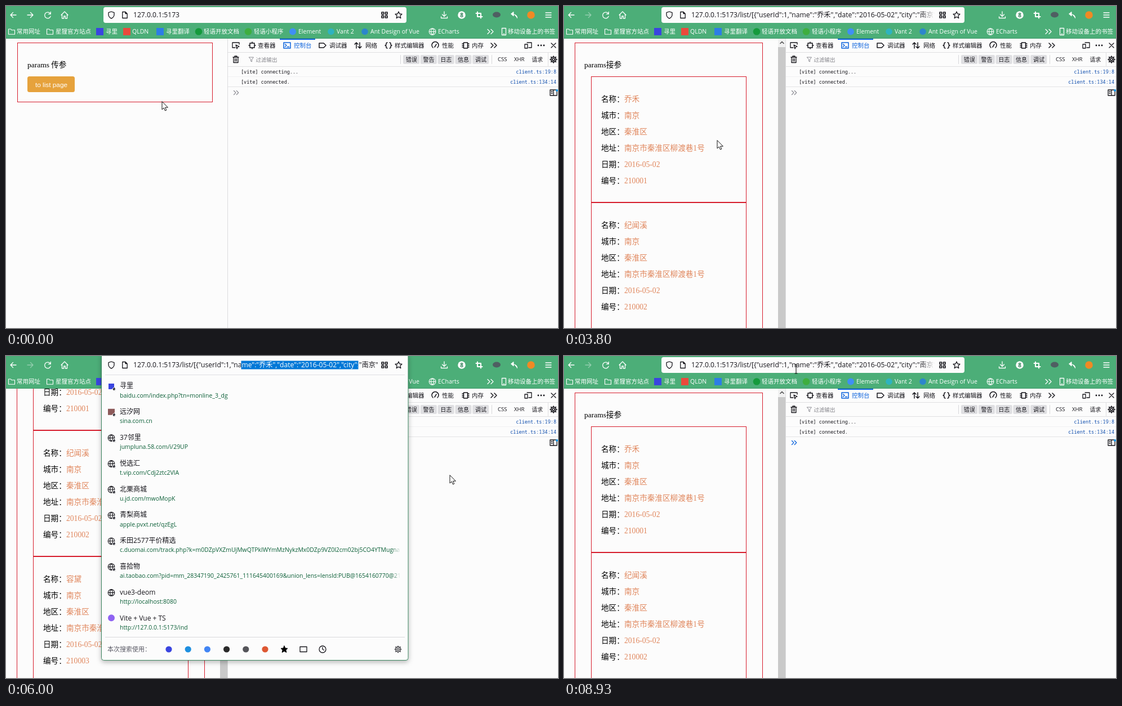
An HTML page that plays this animation: 980 px wide and 572 px high, repeating every 8990 ms.

```html
<!DOCTYPE html>
<html lang="zh-CN">
<head>
<meta charset="utf-8">
<title>params</title>
<style>
html, body { margin: 0; width: 100%; height: 100%; overflow: hidden; background: #fcfcfc; }
svg { display: block; width: 980px; height: 572px; }
text { white-space: pre; }
.ui { font-family: "Open Sans", "Noto Sans CJK SC", "Noto Sans CJK", sans-serif; }
.serif { font-family: "Liberation Serif", "Noto Sans CJK SC", "Noto Sans CJK", serif; }
.arial { font-family: "Liberation Sans", sans-serif; }
.mono { font-family: "Noto Sans Mono", "DejaVu Sans Mono", monospace; }
</style>
</head>
<body>
<svg id="stage" viewBox="0 0 980 572" xmlns="http://www.w3.org/2000/svg"></svg>
<script>
const LOOP = 8990, STEP = 200 / 3;
const GREEN = '#4cae78', INK = '#15141a', PAPER = '#fcfcfc', RED = '#d61c2c', BLUE = '#0a62dc';

const esc = s => s.replace(/&/g, '&amp;').replace(/</g, '&lt;');
const text = (x, y, s, size, fill = INK, cls = 'ui', extra = '') =>
  `<text x="${x}" y="${y}" font-size="${size}" fill="${fill}" class="${cls}" ${extra}>${esc(s)}</text>`;
const rect = (x, y, w, h, fill, extra = '') =>
  `<rect x="${x}" y="${y}" width="${w}" height="${h}" fill="${fill}" ${extra}/>`;
const frame = (x, y, w, h) => rect(x, y, w, h, 'none', `stroke="${RED}"`);
const dot = (x, y, r, fill) => `<circle cx="${x}" cy="${y}" r="${r}" fill="${fill}"/>`;
const icon = (x, y, d, color = INK, w = 1.3, fill = 'none', extra = '') =>
  `<path transform="translate(${x} ${y})" d="${d}" stroke="${color}" stroke-width="${w}" fill="${fill}" stroke-linecap="round" stroke-linejoin="round" ${extra}/>`;
const line = (x1, y1, x2, y2, color = '#e0e0e2') =>
  `<path d="M${x1} ${y1}L${x2} ${y2}" stroke="${color}"/>`;
const group = (id, body) => `<g id="${id}">${body}</g>`;

const ICON = {
  back: 'M5 0H-5M-.5-4.5-5 0-.5 4.5',
  forward: 'M-5 0H5M.5-4.5 5 0 .5 4.5',
  reload: 'M4.8-2.6A5.4 5.4 0 1 0 5.2 1.6M5.2-6v3.8H1.4',
  close: 'M-4-4 4 4M4-4-4 4',
  home: 'M-6 0 0-6 6 0M-4.5-1.5V6h3.2V2h2.6v4h3.2V-1.5',
  shield: 'M0-6 5-4.3V0Q4.5 4 0 6.2-4.5 4-5 0V-4.3Z',
  file: 'M-4.2-5.5H1L4.2-2.3V5.5H-4.2ZM1-5.5v3.2h3.2',
  grid: 'M-5-5h3.6v3.6H-5ZM1.4-5H5v3.6H1.4ZM-5 1.4h3.6V5H-5ZM1.4 1.4H5V5H1.4Z',
  star: 'M0-6 1.8-2 6-1.6 2.9 1.3 3.8 5.6 0 3.3-3.8 5.6-2.9 1.3-6-1.6-1.8-2Z',
  download: 'M0-6V2.5M-3.5-1 0 2.5 3.5-1M-5.5 3v2.5h11V3',
  crop: 'M-3-5.5V3H5.5M-5.5-3H3V5.5',
  undo: 'M5.5 5Q5.5-1.5-1-1.5V1.5L-5.5-2.5-1-6v3',
  menu: 'M-5-4H5M-5 0H5M-5 4H5',
  folder: 'M-5.5-4.5h4l1.5 1.8h5.5V4.7h-11Z',
  globe: 'M-5.8 0a5.8 5.8 0 1 0 11.6 0a5.8 5.8 0 1 0-11.6 0H5.8M0-5.8Q-5.4 0 0 5.8Q5.4 0 0-5.8',
  more: 'M-5-4-1 0-5 4M1-4 5 0 1 4',
  prompt: 'M-4-3.5-.5 0-4 3.5M.8-3.5 4.3 0 .8 3.5',
  phone: 'M-3.5-6h7V6h-7ZM-.5 4h1',
  picker: 'M-1 4h-5v-9H6v3M0-1 6 2 3.2 3 2 6Z',
  inspect: 'M-4-4H4V4H-4ZM0-6v2M0 6V4M-6 0h2M6 0H4',
  terminal: 'M-6-5H6V5H-6ZM-3.5-2.2-1 0-3.5 2.2M.5 2.5h3',
  tag: 'M-6-4H2L6 0 2 4H-6Z',
  arrows: 'M-3 5V-5M-6-2-3-5 0-2M3-5V5M0 2 3 5 6 2',
  braces: 'M-2-5Q-4-5-4-3-4 0-6 0-4 0-4 3-4 5-2 5M2-5Q4-5 4-3 4 0 6 0 4 0 4 3 4 5 2 5',
  gauge: 'M-4 4A6 6 0 1 1 4 4M-1 3 2-2',
  chip: 'M-3.5-5h7V5h-7ZM-6-3h2.5M-6 0h2.5M-6 3h2.5M6-3H3.5M6 0H3.5M6 3H3.5',
  devices: 'M-2-5H6V4H1M-6-2h5V5h-5Z',
  trash: 'M-5-4H5M-2-4v-2h4v2M-4-4V5.5H4V-4M-1.3-1.5v4.5M1.3-1.5v4.5',
  funnel: 'M-4-4H4L1 0V4L-1 3V0Z',
  split: 'M-6-5H6V5H-6ZM0-5V5M-4-2h2M-4 1h2',
  box: 'M-6-4.5H6V4.5H-6Z',
  clock: 'M-6 0a6 6 0 1 0 12 0a6 6 0 1 0-12 0M0-3.5V0L2.5 1.5',
  pin: 'M-3-1 1-4 3 1 1 1 4 4 0 2-1 3Z',
  gear: 'M-2 0a2 2 0 1 0 4 0a2 2 0 1 0-4 0M-4.4 0a4.4 4.4 0 1 0 8.8 0a4.4 4.4 0 1 0-8.8 0'
    + 'M0-5V-6M0 5V6M-5 0H-6M5 0H6M-3.5-3.5l-.8-.8M3.5-3.5l.8-.8M-3.5 3.5l-.8.8M3.5 3.5l.8.8'
};

const URL_HEAD = '127.0.0.1:5173';
const URL_FULL = URL_HEAD + '/list/[{"userId":1,"name":"乔禾","date":"2016-05-02","city":"南京"';

function homePage() {
  return frame(20.5, 65.5, 346, 105)
    + text(38, 109, 'params 传参', 13.5, '#000', 'serif')
    + rect(38, 125, 84, 28, '#e6a23c', 'rx="3.5" id="button"')
    + text(52, 144, 'to list page', 11.8, '#fff', 'arial');
}

function listPage() {
  const people = ['乔禾', '纪闻溪', '容黛'];
  const card = (name, i) => {
    const top = 125.5 + i * 224;
    const rows = [['名称', name], ['城市', '南京'], ['地区', '秦淮区'], ['地址', '南京市秦淮区柳渡巷1号'],
      ['日期', '2016-05-02'], ['编号', String(210001 + i)]];
    return frame(48.5, top, 275, 223) + rows.map(([key, value], j) => {
      const y = top + 44.5 + j * 29;
      return text(66, y, key + '：', 13.6, '#000', 'serif') + text(107, y, value, 13.6, '#e0865c', 'serif');
    }).join('');
  };
  return group('scroll', frame(19.5, 65.5, 333, 800)
      + text(36, 109, 'params接参', 13.5, '#000', 'serif') + people.map(card).join(''))
    + rect(380, 58, 13, 15, '#f1f1f1') + rect(380, 73, 13, 499, '#c9c9c9')
    + icon(387, 65, 'M-3 1.5 0-1.5 3 1.5', '#505050', 1.6);
}

function devtools() {
  const tabs = [[437, 447, 'inspect', '查看器'], [499, 511, 'terminal', '控制台'], [562, 574, 'tag', '调试器'],
    [625, 638, 'arrows', '网络'], [679, 690, 'braces', '样式编辑器'], [762, 774, 'gauge', '性能'], [816, 827, 'chip', '内存']];
  const filters = ['错误', '警告', '日志', '信息', '调试'];
  return rect(393, 58, 587, 514, PAPER) + line(393.5, 58, 393.5, 572, '#dcdcde')
    + line(394, 82.5, 980, 82.5) + line(394, 107.5, 980, 107.5) + line(394, 125.5, 980, 125.5, '#f1f1f2')
    + line(394, 143.5, 980, 143.5, '#e4e4e6')
    + rect(486, 58, 63, 2, BLUE)
    + icon(408, 70, ICON.picker)
    + tabs.map(([ix, tx, name, label], i) => {
      const color = i === 1 ? BLUE : INK;
      return icon(ix, 70, ICON[name], color, 1.5) + text(tx, 74, label, 10.5, color);
    }).join('')
    + icon(866, 70, ICON.more, INK, 1.5) + icon(927, 70, ICON.devices)
    + [945, 950, 955].map(x => dot(x, 70, 1.4, INK)).join('') + icon(972, 70, ICON.close)
    + icon(408, 95, ICON.trash) + icon(435.5, 95, ICON.funnel, '#909096', 1)
    + text(443.5, 98.5, '过滤输出', 9.5, '#85858b')
    + line(700.5, 87, 700.5, 103, '#d7d7db') + line(862.5, 87, 862.5, 103, '#d7d7db') + line(962.5, 83, 962.5, 107)
    + filters.map((s, i) => rect(705 + i * 30.8, 87, 29, 16, '#dfdfe2', 'rx="2"') + text(709.7 + i * 30.8, 98.7, s, 10)).join('')
    + text(873, 98.3, 'CSS', 9.6) + text(902, 98.3, 'XHR', 9.6) + text(933.5, 98.6, '请求', 9.8)
    + icon(972, 95, ICON.gear, INK, 1.7)
    + text(417, 119.5, '[vite] connecting...', 8.52, INK, 'mono') + text(417, 137.5, '[vite] connected.', 8.52, INK, 'mono')
    + text(977, 119.5, '', 8.52, '#0a4aac', 'mono', 'text-anchor="end" id="src1"')
    + text(977, 137.5, '', 8.52, '#0a4aac', 'mono', 'text-anchor="end" id="src2"')
    + icon(408.5, 154, ICON.prompt, '#8f8f96', 1.3, 'none', 'id="prompt"')
    + rect(421.5, 148, 1.2, 12, INK, 'id="caret"')
    + icon(972, 154, ICON.split) + dot(978, 150, 2, '#0a9bf0');
}

function chrome() {
  const marks = [[19, '常用网址'], [88, '星狸官方站点'], [177, '寻里'], [224, 'QLDN'], [284, '寻里翻译'], [351, '轻语开放文档'],
    [440, '轻语小程序'], [519, 'Element'], [587, 'Vant 2'], [647, 'Ant Design of Vue'], [767, 'ECharts'], [891, '移动设备上的书签']];
  const W = '#fff';
  return rect(0, 0, 980, 58, GREEN) + line(0, 57.5, 980, 57.5, '#3f9868')
    + rect(59, 2, 30, 28, '#69bd8f', 'rx="4" id="hover"')
    + icon(13, 16, ICON.back, W) + icon(43, 16, ICON.forward, W, 1.3, 'none', 'id="forward"')
    + icon(74, 16.5, ICON.reload, W, 1.3, 'none', 'id="reload"') + icon(74, 16.5, ICON.close, W, 1.3, 'none', 'id="stop"')
    + icon(104, 16, ICON.home, W)
    + icon(778, 16, ICON.download, W) + dot(809, 16, 6.8, W) + text(809, 19.7, '8', 10, '#2f8057', 'ui', 'text-anchor="middle" font-weight="700"')
    + icon(840, 16, ICON.crop, W, 2) + `<ellipse cx="871" cy="15.5" rx="7" ry="5" fill="#4f5f62"/>`
    + icon(902, 16.5, ICON.undo, W, 1, W) + dot(932, 16, 6.8, '#f08a24') + icon(963, 16, ICON.menu, W)
    + icon(10, 45.5, ICON.folder, W, 1.1) + icon(78, 45.5, ICON.folder, W, 1.1)
    + rect(160, 39, 13, 13, '#3a45e0') + rect(208, 39, 13, 13, '#ea4a3c') + rect(267, 39, 13, 13, '#2d7de6')
    + dot(342, 45.5, 6.3, '#159a3c') + dot(430, 45.5, 6.3, '#3fae3f') + dot(509, 45.5, 6, '#3f8ff5')
    + dot(577, 45.5, 5.8, '#2fb3c0') + dot(637, 45.5, 5.8, '#2c86cc')
    + icon(757, 45.5, ICON.globe, W, 1.1) + icon(860, 45.5, ICON.more, W) + icon(884, 45.5, ICON.phone, W)
    + marks.map(([x, s]) => text(x, 49.3, s, 10.5, W)).join('');
}

function dropdown() {
  const sites = [
    ['寻里', 'baidu.com/index.php?tn=monline_3_dg'], ['远汐网', 'sina.com.cn'], ['37邻里', 'jumpluna.58.com/i/29UP'],
    ['悦选汇', 't.vip.com/Cdj2ztc2VIA'], ['北栗商城', 'u.jd.com/mwoMopK'], ['青梨商城', 'apple.pvxt.net/qzEgL'],
    ['禾田2577平价精选', 'c.duomai.com/track.php?k=m0DZpVXZmUjMwQTPklWYmMzNykzMx0DZp9VZ0l2cm02bj5CO4YTMugna'],
    ['喜拾物', 'ai.taobao.com?pid=mm_28347190_2425761_111645400169&union_lens=lensId:PUB@1654160770@210'],
    ['vue3-deom', 'http://localhost:8080'], ['Vite + Vue + TS', 'http://127.0.0.1:5173/ind']];
  const row = ([title, url], i) => {
    const y = 53 + i * 45.8;
    const mark = i === 0 ? rect(182, y - 4, 10, 10, '#3a45e0') : i === 1 ? rect(181, y - 5, 12, 11, '#8d5a5a')
      : i === 9 ? dot(187, y, 6, '#8f63f2') : icon(187, y + 1, ICON.globe, INK, 1.1);
    return mark + (i < 8 ? icon(192, y + 6, ICON.pin, PAPER, 1, '#3a3a42') : '')
      + text(202, y + 4.3, title, 12) + text(202, y + 20.5, url, 10.45, '#0b5f37', 'ui', 'clip-path="url(#rowClip)"');
  };
  const engines = ['#3a45e0', '#1e8fe0', '#4285f4', '#2a2a2a', '#55555a', '#de5833'];
  return rect(169.5, -4, 544.5, 544.5, PAPER, 'id="panel" rx="4" stroke="#3c8560" filter="url(#shadow)"')
    + line(176, 33.5, 708, 33.5, '#dfdfe2') + line(176, 499.5, 708, 499.5, '#d9d9dc')
    + sites.map(row).join('') + rect(685, 335, 18, 65, 'url(#fade)')
    + text(180, 524.8, '本次搜索使用：', 11, '#5b5b66')
    + engines.map((c, i) => dot(289 + i * 34.2, 521, 5.6, c)).join('')
    + icon(494, 521, ICON.star, '#000', 1, '#000') + icon(528, 521, ICON.box) + icon(562, 521, ICON.clock)
    + icon(696, 521, ICON.gear, INK, 1.2);
}

function addressBar() {
  return icon(187, 16, ICON.shield) + icon(211, 16, ICON.file)
    + `<g clip-path="url(#urlClip)">` + text(226, 20.3, '', 12.1, INK, 'ui', 'id="url"')
    + rect(0, 8.5, 0, 15, '#0078d7', 'id="mark"')
    + text(226, 20.3, URL_FULL, 12.1, '#fff', 'ui', 'clip-path="url(#markClip)" id="marked"') + '</g>'
    + rect(632, 6, 31, 20, 'url(#fade)', 'id="urlFade"')
    + icon(672, 16, ICON.grid, INK, 1.6) + icon(697, 16, ICON.star);
}

const stage = document.getElementById('stage');
stage.innerHTML = `<defs>
  <linearGradient id="fade"><stop offset="0" stop-color="${PAPER}" stop-opacity="0"/><stop offset=".85" stop-color="${PAPER}"/></linearGradient>
  <filter id="shadow" x="-10%" y="-10%" width="120%" height="120%"><feDropShadow dx="0" dy="3" stdDeviation="4" flood-opacity=".28"/></filter>
  <clipPath id="urlClip"><rect x="226" y="0" width="437" height="32"/></clipPath>
  <clipPath id="rowClip"><rect x="202" y="34" width="499" height="465"/></clipPath>
  <clipPath id="markClip"><rect id="markBox" y="0" height="32"/></clipPath></defs>`
  + rect(0, 0, 980, 572, PAPER) + group('home', homePage()) + group('list', listPage()) + devtools() + chrome()
  + rect(173, 2, 538, 28, PAPER, 'rx="4"') + group('drop', dropdown()) + addressBar()
  + group('cursor',
    icon(0, 0, 'M0 0V14L3.2 11 5.5 16 7.8 15 5.6 10.2H10Z', '#111', 1, '#fff', 'id="arrow"')
    + icon(0, 0, 'M-2-8H2M0-8V8M-2 8H2', '#111', 1.1, 'none', 'id="beam"')
    + icon(0, 0, 'M-1.5 0Q0-1.6 1.5 0V5Q4 4.5 4.3 6 7 5.5 7.2 7 9 7 9 9V12L7 16H0L-4.5 9.5Q-4.5 7.5-1.5 9Z', '#111', 1, '#fff', 'id="hand"'));

const $ = {};
stage.querySelectorAll('[id]').forEach(el => $[el.id] = el);
const show = (id, on) => $[id].setAttribute('display', on ? 'inline' : 'none');
const set = (id, attrs) => Object.entries(attrs).forEach(([k, v]) => $[id].setAttribute(k, v));
const write = (id, s) => { if ($[id].textContent !== s) $[id].textContent = s; };

// Keys are [ms, ...values], eased between neighbours.
function along(keys, t) {
  let i = 0;
  while (i < keys.length - 2 && t >= keys[i + 1][0]) i++;
  const [t0, ...a] = keys[i], [t1, ...b] = keys[i + 1];
  const p = Math.min(1, Math.max(0, (t - t0) / (t1 - t0))), e = p * p * (3 - 2 * p);
  return a.map((v, j) => v + (b[j] - v) * e);
}

const POINTER = [[0, 277, 170], [467, 277, 170], [933, 88, 137], [1133, 88, 137], [1600, 225, 274], [2133, 225, 274],
  [2800, 640, 24], [2933, 640, 24], [3467, 362, 24], [3600, 362, 24], [3800, 272, 239], [4300, 272, 239],
  [4533, 430, 80], [4933, 630, 24], [5000, 630, 24], [5133, 546, 26], [5467, 417, 28], [5600, 417, 28],
  [5933, 788, 212], [6067, 788, 212], [6800, 72, 14], [7067, 72, 14], [7333, 250, 257], [8333, 250, 257],
  [8800, 328, 50], [8933, 412, 23]];
const SCROLL = [[3867, 0], [4467, 217]];
const MARK = [[5066, 625], [5133, 613], [5467, 417.5], [5600, 417.5]];

function draw(ms) {
  const t = Math.floor((ms + 4) / STEP) * STEP + .5;
  const onHome = t < 1200, open = t > 5066 && t < 6133, loading = t > 7133 && t < 7933, focused = t > 6133;

  show('home', onHome);
  show('list', !onHome && !loading);
  set('scroll', { transform: `translate(0 ${t < 7133 ? -along(SCROLL, t)[0] : 0})` });
  set('forward', { opacity: onHome ? 1 : .4 });
  show('reload', !loading);
  show('stop', loading);

  write('url', onHome ? URL_HEAD : URL_FULL);
  show('urlFade', !onHome && !open);
  show('drop', open);
  const inset = t < 5200 ? 1 : 0;
  set('panel', { x: 169.5 + inset, width: 544.5 - 2 * inset, height: 544.5 - inset });
  const left = along(MARK, t)[0], span = { x: left, width: 625.5 - left };
  show('mark', open);
  show('marked', open);
  set('mark', span);
  set('markBox', span);

  write('src1', loading ? 'client:206:9' : 'client.ts:19:8');
  write('src2', loading ? 'client:286:21' : 'client.ts:134:14');
  set('prompt', { stroke: focused ? BLUE : '#8f8f96' });
  show('caret', focused && (t - 6133) % 1000 < 500);

  const [x, y] = along(POINTER, t);
  const overButton = onHome && x > 38 && x < 122 && y > 125 && y < 153;
  const overUrl = x > 226 && x < 657 && y < 31;
  set('cursor', { transform: `translate(${x} ${y})` });
  show('hand', overButton);
  show('beam', overUrl);
  show('arrow', !overButton && !overUrl);
  set('button', { fill: overButton ? '#ebb563' : '#e6a23c' });
  show('hover', x > 59 && x < 89 && y < 30);
}

const start = performance.now();
function tick() {
  draw((performance.now() - start) % LOOP);
  requestAnimationFrame(tick);
}
tick();
</script>
</body>
</html>
```
